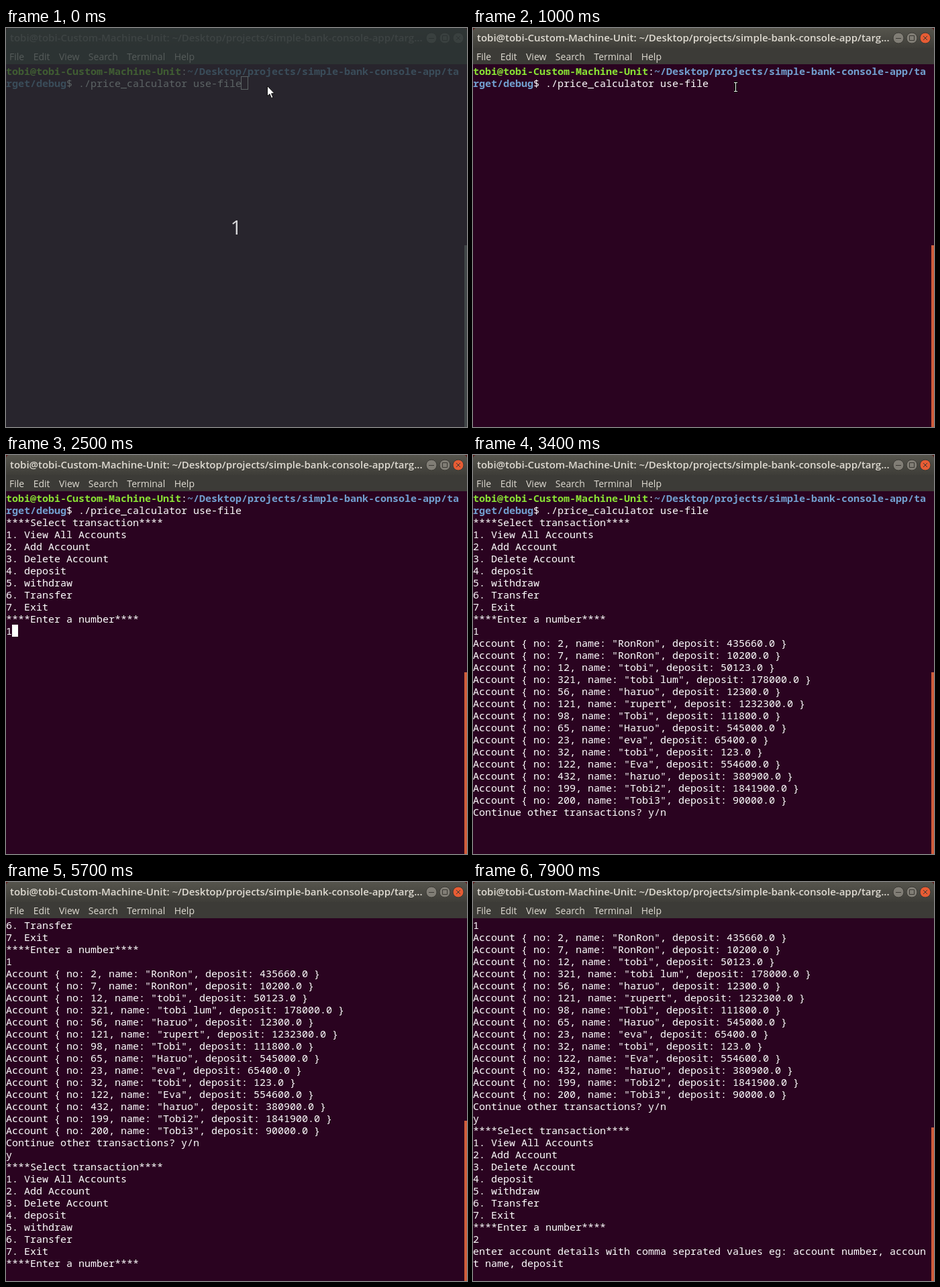
An HTML page with a canvas for the animation above (8 s loop, 687 by 595 pixels).

```html
<!DOCTYPE html>
<html lang="en">
<head>
<meta charset="utf-8">
<title>Terminal</title>
<style>
html, body { margin: 0; width: 100%; height: 100%; overflow: hidden; background: #2a0320; }
canvas { display: block; }
</style>
</head>
<body>
<canvas id="stage" width="687" height="595"></canvas>
<script>
const ctx = document.getElementById('stage').getContext('2d');
const LOOP = 8000, CELL_W = 9, CELL_H = 18, TOP = 55, ROWS = 30;
const MONO = '15px "Noto Sans Mono", monospace';
const SANS = '"Open Sans", "Noto Sans", sans-serif';

const host = 'tobi@tobi-Custom-Machine-Unit';
const path = '~/Desktop/projects/simple-bank-console-app/target/debug';
const prompt = [
  host + ':' + path.slice(0, 45),
  path.slice(45) + '$ ./price_calculator use-file'
];
const menu = [
  '****Select transaction****', '1. View All Accounts', '2. Add Account',
  '3. Delete Account', '4. deposit', '5. withdraw', '6. Transfer', '7. Exit',
  '****Enter a number****'
];
const accounts = `2,RonRon,435660 7,RonRon,10200 12,tobi,50123 321,tobi_lum,178000
  56,haruo,12300 121,rupert,1232300 98,Tobi,111800 65,Haruo,545000 23,eva,65400
  32,tobi,123 122,Eva,554600 432,haruo,380900 199,Tobi2,1841900 200,Tobi3,90000`
  .split(/\s+/).map(entry => {
    const [no, name, sum] = entry.replace('_', ' ').split(',');
    return `Account { no: ${no}, name: "${name}", deposit: ${sum}.0 }`;
  });

// each turn prints its output, then the user types a one-letter answer
const ENTER = 1400;
const turns = [
  { at: 1500, out: menu, typed: 2500, answer: '1' },
  { at: 3000, out: [...accounts, 'Continue other transactions? y/n'], typed: 4500, answer: 'y' },
  { at: 5300, out: menu, typed: 7200, answer: '2' },
  { at: 7500, out: [
    'enter account details with comma seprated values eg: account number, accoun',
    't name, deposit'
  ], typed: LOOP, answer: '' }
];

// lines printed so far and the time of the latest activity
function session(t) {
  let lines = prompt, last = t < ENTER ? 600 : ENTER;
  for (const { at, out, typed, answer } of turns) {
    if (t < at) break;
    const done = t >= typed;
    lines = [...lines, ...out, done ? answer : ''];
    last = done ? typed : at;
  }
  // keep the answers, drop the empty cursor lines left behind
  return { lines, last };
}

function cursorLit(idle) {
  return idle < 400 || (idle - 400) % 1100 >= 600;
}

function rect(x, y, w, h, fill) {
  ctx.fillStyle = fill;
  ctx.fillRect(x, y, w, h);
}

function text(str, x, y, font, fill) {
  ctx.font = font;
  ctx.fillStyle = fill;
  ctx.fillText(str, x, y);
}

function stroke(shape, color, width = 1) {
  ctx.strokeStyle = color;
  ctx.lineWidth = width;
  ctx.stroke(shape);
}

function at(x, y, paint) {
  ctx.save();
  ctx.translate(x, y);
  paint();
  ctx.restore();
}

// blends two RGB triples
function mix(a, b, k) {
  return `rgb(${a.map((v, i) => Math.round(v + (b[i] - v) * k))})`;
}

const disc = new Path2D();
disc.arc(0, 0, 8, 0, 2 * Math.PI);
const marks = ['M-4 .5h8', 'M-3.5-3.5h7v7h-7z', 'M-3-3l6 6m0-6l-6 6'].map(d => new Path2D(d));
const beam = new Path2D('M-2-6.5h5M.5-6v12M-2 6.5h5');
const arrow = new Path2D('M0 0v15l3.5-3 2.5 6 2.5-1-2.5-5.7 4.5-.3z');

function drawHeader(focus) {
  rect(0, 0, 687, 10, '#5a1a18');
  const shade = ctx.createLinearGradient(0, 0, 0, 30);
  shade.addColorStop(0, mix([70, 69, 63], [86, 85, 77], focus));
  shade.addColorStop(1, mix([60, 59, 55], [62, 61, 56], focus));
  ctx.beginPath();
  ctx.roundRect(0, 0, 687, 40, [5, 5, 0, 0]);
  ctx.fillStyle = shade;
  ctx.fill();
  rect(0, 30, 687, 24, '#3c3b37');

  const title = host + ': ' + path.slice(0, 47) + '...';
  text(title, 6, 20, '600 15px ' + SANS, mix([128, 125, 120], [223, 219, 210], focus));

  const idle = [112, 110, 103];
  marks.forEach((mark, i) => at(634 + 20 * i, 15, () => {
    ctx.fillStyle = mix(idle, i < 2 ? [128, 125, 117] : [231, 92, 52], focus);
    ctx.fill(disc);
    stroke(disc, '#3a3934');
    stroke(mark, '#3a3833');
  }));

  let x = 5;
  for (const name of ['File', 'Edit', 'View', 'Search', 'Terminal', 'Help']) {
    text(name, x, 48, '14px ' + SANS, '#dfdbd2');
    x += ctx.measureText(name).width + 13.5;
  }
}

function drawPrompt(i, y) {
  const blue = '#729fcf', bold = 'bold ' + MONO;
  const split = i ? path.length - 45 : host.length;
  const rest = prompt[i].slice(split + 1);
  text(prompt[i].slice(0, split), 0, y, bold, i ? blue : '#8ae234');
  text(prompt[i][split], split * CELL_W, y, MONO, '#fff');
  text(rest, (split + 1) * CELL_W, y, i ? MONO : bold, i ? '#fff' : blue);
}

function drawScreen(t, focus) {
  const { lines, last } = session(t);
  const scroll = Math.max(0, lines.length - ROWS);
  const rowTop = i => TOP + (i - scroll) * CELL_H;
  rect(0, 54, 687, 541, '#2a0320');
  for (let i = scroll; i < lines.length; i++) {
    const y = rowTop(i) + 15;
    if (i < prompt.length) drawPrompt(i, y);
    else text(lines[i], 0, y, MONO, '#fff');
  }

  const x = lines.at(-1).length * CELL_W, y = rowTop(lines.length - 1);
  if (cursorLit(t - last)) {
    if (focus) rect(x, y, CELL_W, CELL_H, '#fff');
    else {
      ctx.strokeStyle = '#fff';
      ctx.lineWidth = 1;
      ctx.strokeRect(x - .5, y - .5, 10, 19);
    }
  }

  // one screenful of history lies above the first line
  const thumb = Math.round(541 * ROWS / (2 * ROWS + scroll));
  rect(683, 595 - thumb, 4, thumb, mix([139, 134, 136], [208, 92, 58], focus));
}

function drawBeam(x, y) {
  at(x, y, () => {
    stroke(beam, '#000', 3);
    stroke(beam, '#fff');
  });
}

function drawCountdown() {
  rect(0, 0, 687, 595, 'rgba(39, 48, 50, .75)');
  ctx.textAlign = 'center';
  text('1', 343, 308, '30px ' + SANS, '#d8d8da');
  ctx.textAlign = 'left';
  at(389.5, 86.5, () => {
    ctx.fillStyle = '#fff';
    ctx.fill(arrow);
    stroke(arrow, '#111');
  });
}

function draw(t) {
  const focus = t < 300 ? 0 : t < 400 ? .5 : 1;
  drawHeader(focus);
  drawScreen(t, focus);
  if (t < 200) drawCountdown();
  else if (t < ENTER) drawBeam(391, 88);
  else if (t >= 2100 && t < 2500) {
    const k = Math.min(1, (t - 2100) / 300);
    drawBeam(391 - Math.round(8 * k), 88 + Math.round(190 * k));
  }
}

const start = performance.now();
function tick() {
  draw((performance.now() - start) % LOOP);
  requestAnimationFrame(tick);
}
tick();
</script>
</body>
</html>
```
